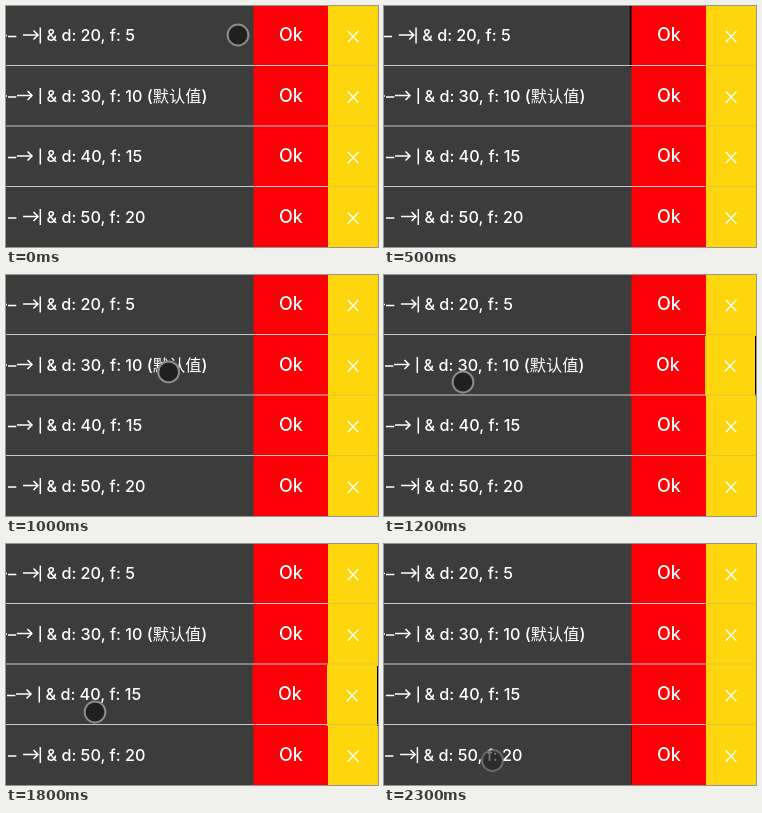
Animation of 372x241 px, one loop 2400 ms. Source, as an HTML page with a canvas:

```html
<!DOCTYPE html>
<html lang="zh">
<head>
<meta charset="utf-8">
<style>
html, body { margin: 0; width: 100%; height: 100%; overflow: hidden; background: #000; }
canvas { display: block; }
</style>
</head>
<body>
<canvas id="stage" width="372" height="241"></canvas>
<script>
const ctx = document.getElementById('stage').getContext('2d');
const LOOP = 2400, STEP = 100, FADE = 250, PITCH = 60.5;
const EDGE = 247.5, SPLIT = 322, WIDTH = 372;
const FONT = 'Inter, "Noto Sans CJK SC", "Noto Sans CJK", sans-serif';

// Each row is dragged from one point to another between down and up.
const rows = [
  { d: 20, f: 5, arrow: 17, down: 0, up: 200, from: [232, 29], to: [112, 26] },
  { d: 30, f: 10, note: ' (默认值)', arrow: 11, down: 800, up: 1200, from: [190.5, 93.5], to: [79, 107] },
  { d: 40, f: 15, arrow: 11, down: 1600, up: 1800, from: [203.5, 158.5], to: [89, 168] },
  { d: 50, f: 20, arrow: 17, down: 2100, up: 2200, from: [214, 211], to: [108.5, 216.5] }
];

const clamp = v => Math.max(0, Math.min(1, v));

function box(color, x, y, w, h) {
  ctx.fillStyle = color;
  ctx.fillRect(x, y, w, h);
}

function label(text, x, y, size) {
  ctx.font = `500 ${size}px ${FONT}`;
  ctx.fillStyle = '#fff';
  ctx.fillText(text, x, y);
}

function path(...points) {
  ctx.beginPath();
  points.forEach(p => ctx.lineTo(...p));
  ctx.stroke();
}

// Stiffer rows bounce less after release.
function bounce({ d, f, up }, t) {
  return t > up ? 900 / (d * f) * 2 ** ((up + STEP - t) / STEP) : 0;
}

function drawRow(row, i, t) {
  const y = i * PITCH, top = Math.round(y);
  const push = t === row.up ? 1 : 0;
  const shift = push + bounce(row, t);
  const a = row.arrow;
  box('#3c3c3c', -shift, top, EDGE + .5, 61);
  box('#fb0007', EDGE - push, top, SPLIT - EDGE, 61);
  box('#fed60e', SPLIT - push, top, WIDTH - SPLIT, 61);

  ctx.strokeStyle = '#fff';
  ctx.lineWidth = 1.5;
  ctx.save();
  ctx.translate(-shift, y);
  if (i < 2) path([-4, 29.5], [1, 29.5]);
  path([2, 30.5], [10.3, 30.5]);
  path([a, 29], [a + 15, 29]);
  path([a + 10.5, 24.5], [a + 15, 29], [a + 10.5, 33.5]);
  path([34.3, 21.5], [34.3, 37.5]);
  label(`& d: ${row.d}, f: ${row.f}${row.note || ''}`, 40.5, 35.3, 16.2);
  ctx.restore();

  ctx.save();
  ctx.translate(-push, y);
  label('Ok', 273, 35.2, 18);
  ctx.lineWidth = 1.3;
  path([341.8, 25], [352.4, 36.2]);
  path([352.4, 25], [341.8, 36.2]);
  ctx.restore();
}

function drawTouch({ down, up, from, to }, t) {
  const u = clamp((t - down) / (up - down)) ** 2;
  const [x, y] = from.map((v, k) => v + (to[k] - v) * u);
  ctx.globalAlpha = clamp(1 - Math.max(down - t, t - up) / FADE);
  ctx.beginPath();
  ctx.arc(x, y, 10.4, 0, Math.PI * 2);
  ctx.fillStyle = '#202020';
  ctx.fill();
  ctx.strokeStyle = '#8c8c8c';
  ctx.lineWidth = 2;
  ctx.stroke();
  ctx.globalAlpha = 1;
}

function draw(now) {
  const t = Math.floor(now % LOOP / STEP) * STEP;
  box('#000', 0, 0, WIDTH, 241);
  rows.forEach((row, i) => drawRow(row, i, t));
  for (let i = 1; i < rows.length; i++) {
    const y = i * PITCH - 1.5;
    box('#c8c8c8', 0, y, SPLIT, 1);
    box('#e3c637', SPLIT, y, WIDTH - SPLIT, 1);
  }
  rows.forEach(row => drawTouch(row, t));
}

const start = performance.now();
(function tick() {
  draw(performance.now() - start);
  requestAnimationFrame(tick);
})();
</script>
</body>
</html>
```
